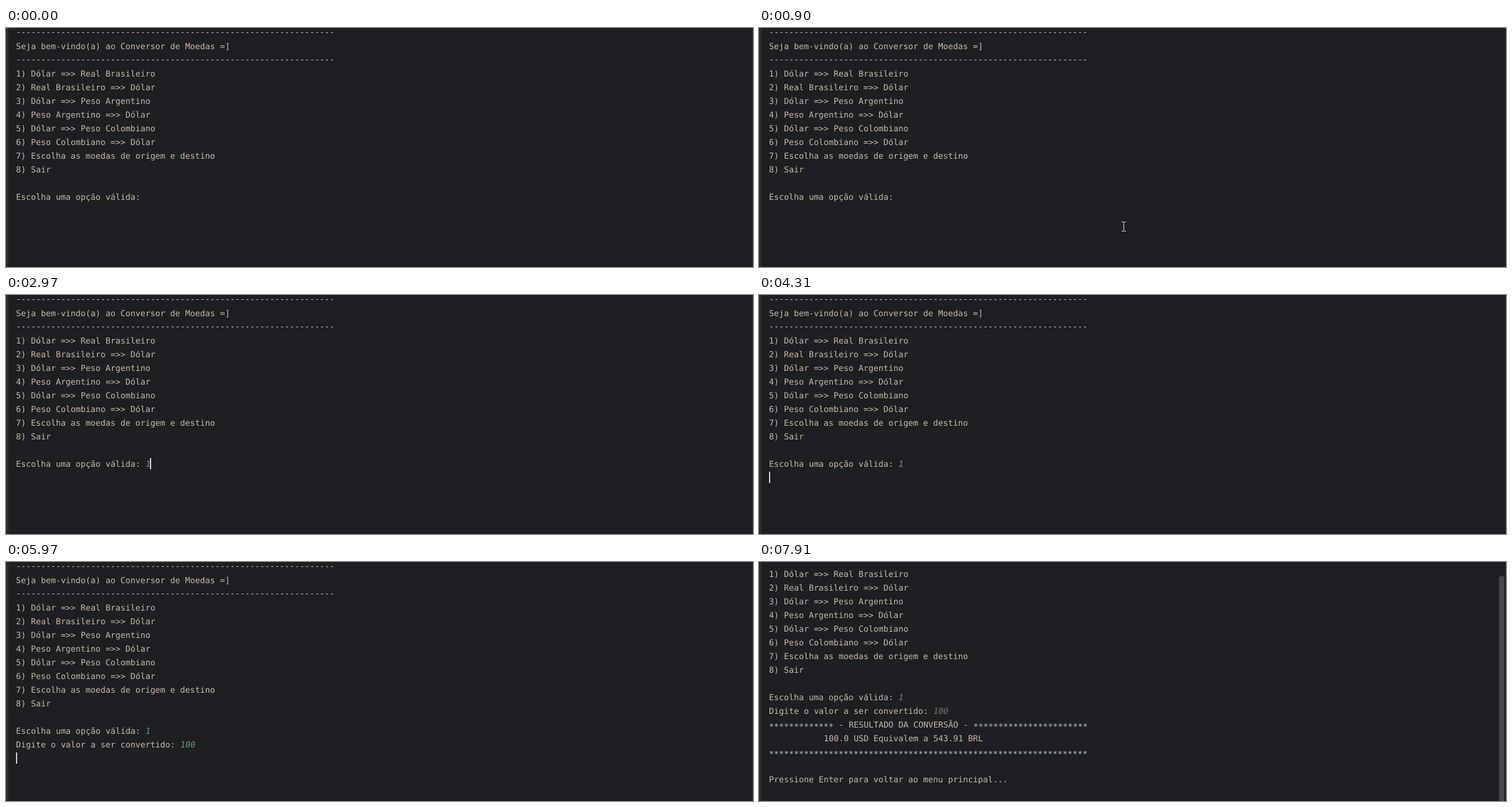
An HTML page for the animation above (8000 ms loop, 1199 by 384 pixels).

```html
<!DOCTYPE html>
<html lang="pt-BR">
<head>
<meta charset="utf-8">
<title>Conversor de Moedas</title>
<style>
  html, body { margin: 0; width: 100%; height: 100%; overflow: hidden; background: #1e1f22; }
  svg { display: block; width: 1199px; height: 384px; }
  text {
    font-family: "DejaVu Sans Mono", "Noto Sans Mono", monospace;
    font-size: 13.288px;
    font-variant-ligatures: none;
    text-rendering: geometricPrecision;
    white-space: pre;
    fill: #c5b7a6;
  }
  .input { font-style: italic; fill: #6a9a70; }
  .done .input { fill: #7f786a; }
  .stars { fill: #b2bcc0; }
</style>
</head>
<body>
<svg viewBox="0 0 1199 384">
  <rect width="1199" height="384" fill="#1e1f22"/>
  <rect width="4" height="384" fill="#2b2d30"/>
  <rect x="1198" width="1" height="384" fill="#2b2d30"/>
  <g id="console">
    <rect id="caret" width="2" height="18" fill="#ced0d6"/>
  </g>
  <rect id="scrollbar" x="1188" y="23" width="8" height="361" fill="#464749"/>
  <path id="pointer" d="M0 .5h3m1 0h3M3.5 1v14M0 15.5h3m1 0h3" fill="none" stroke="#dcdcdc"/>
</svg>
<script>
const LOOP = 8000, COL = 8, ROW = 22, LEFT = 16;
const RESULT_AT = 6170, SCROLL = 54;
const POINTER = { from: 200, to: 1040, step: 70 };

const $ = id => document.getElementById(id);
const [consoleBox, caret, scrollbar, pointer] =
  ['console', 'caret', 'scrollbar', 'pointer'].map($);
const timed = [];

// Hyphen rules and asterisks are shifted to sit on the middle of the line.
function print(row, col, string, { at = 0, kind = '', dy = 0 } = {}) {
  const node = document.createElementNS('http://www.w3.org/2000/svg', 'text');
  node.setAttribute('x', LEFT + col * COL);
  node.setAttribute('y', 12 + row * ROW + dy);
  node.setAttribute('class', kind);
  node.textContent = string;
  consoleBox.insertBefore(node, caret);
  timed.push({ node, at });
}
const stars = (row, col, count) =>
  print(row, col, '*'.repeat(count), { at: RESULT_AT, kind: 'stars', dy: 2.5 });
const typed = (row, col, string, at) => print(row, col, string, { at, kind: 'input' });

const rule = '-'.repeat(64);
print(0, 0, rule, { dy: -1 });
print(1, 0, 'Seja bem-vindo(a) ao Conversor de Moedas =]');
print(2, 0, rule, { dy: -1 });
[
  'Dólar =>> Real Brasileiro',
  'Real Brasileiro =>> Dólar',
  'Dólar =>> Peso Argentino',
  'Peso Argentino =>> Dólar',
  'Dólar =>> Peso Colombiano',
  'Peso Colombiano =>> Dólar',
  'Escolha as moedas de origem e destino',
  'Sair'
].forEach((label, i) => print(3 + i, 0, `${i + 1}) ${label}`));

print(12, 0, 'Escolha uma opção válida:');
typed(12, 26, '1', 2970);
print(13, 0, 'Digite o valor a ser convertido:', { at: 4510 });
typed(13, 33, '1', 5300);
typed(13, 34, '0', 5500);
typed(13, 35, '0', 5700);

stars(14, 0, 13);
print(14, 14, '- RESULTADO DA CONVERSÃO -', { at: RESULT_AT });
stars(14, 41, 23);
print(15, 11, '100.0 USD Equivalem a 543.91 BRL', { at: RESULT_AT });
stars(16, 0, 64);
print(18, 0, 'Pressione Enter para voltar ao menu principal...', { at: RESULT_AT });

// [time, column, row]; an entry without a position hides the caret.
const caretSteps = [
  [0], [970, 26, 12], [1780], [2310, 26, 12], [2770],
  [2970, 27, 12], [3300, 0, 13], [3850], [4310, 0, 13],
  [4510, 33, 13], [5300, 34, 13], [5500, 35, 13], [5700, 36, 13],
  [5970, 0, 14], [RESULT_AT, 0, 19], [6850], [7380, 0, 19], [7910]
];

const show = (node, on) => node.setAttribute('visibility', on ? 'visible' : 'hidden');
const mix = (a, b, u) => a.map((v, i) => Math.round(v + (b[i] - v) * u));

function pointerAt(t) {
  const n = Math.floor((t - POINTER.from) / POINTER.step);
  const start = [950, 354], turn = [474, 305], end = [601, 312];
  return n <= 7
    ? mix(start, turn, Math.sin(n / 7 * Math.PI / 2))
    : mix(turn, end, (1 - Math.cos((n - 7) / 4 * Math.PI)) / 2);
}

function draw() {
  const t = performance.now() % LOOP;
  const finished = t >= RESULT_AT;

  timed.forEach(({ node, at }) => show(node, t >= at));
  consoleBox.setAttribute('transform', `translate(0 ${finished ? -SCROLL : 0})`);
  consoleBox.setAttribute('class', finished ? 'done' : '');
  show(scrollbar, finished);

  const [, col, row] = caretSteps.findLast(([at]) => t >= at);
  show(caret, row !== undefined);
  if (row !== undefined) {
    caret.setAttribute('x', LEFT + col * COL - (col ? 1 : 0));
    caret.setAttribute('y', row * ROW - 2);
  }

  const moving = t >= POINTER.from && t < POINTER.to;
  show(pointer, moving);
  if (moving) pointer.setAttribute('transform', `translate(${pointerAt(t)})`);

  requestAnimationFrame(draw);
}
draw();
</script>
</body>
</html>
```
